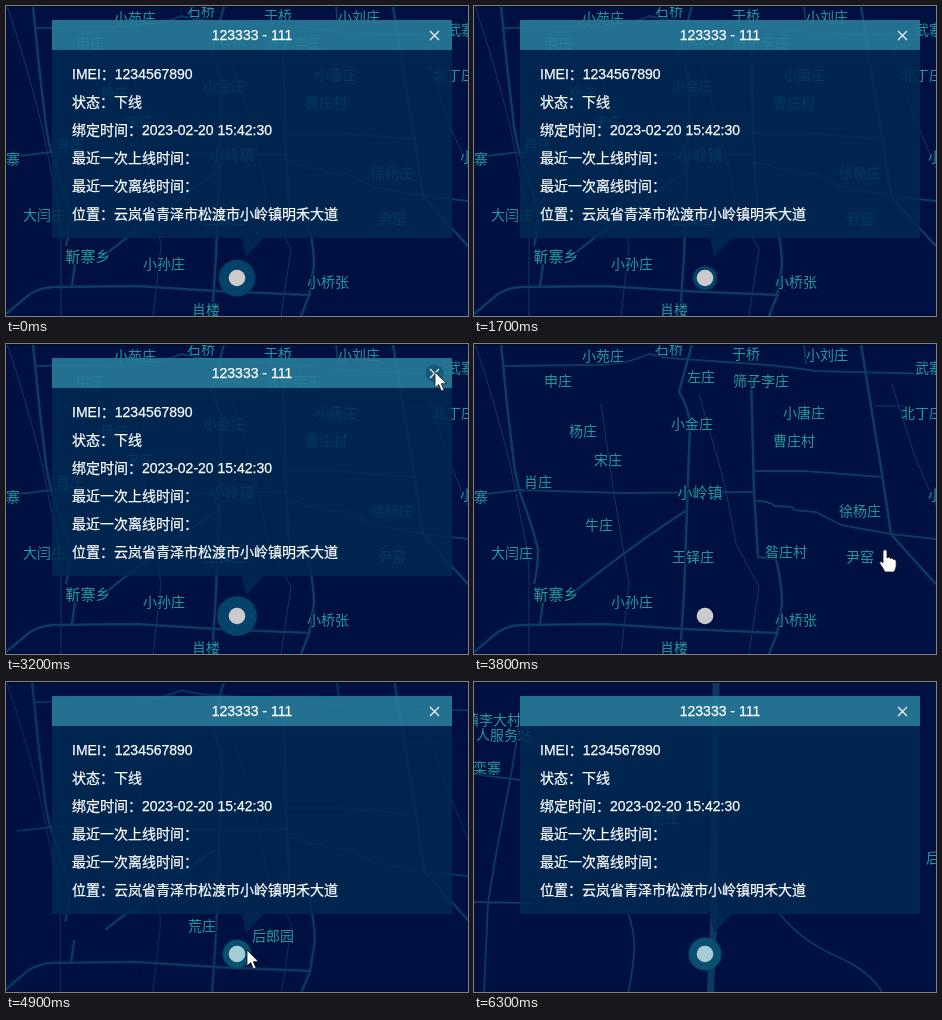
Write an HTML page that moves like this. It is 462 px wide and 310 px high and loops after 6400 ms.

```html
<!DOCTYPE html>
<html lang="zh-CN">
<head>
<meta charset="utf-8">
<title>Device map</title>
<style>
html, body { margin: 0; width: 100%; height: 100%; overflow: hidden; background: #001041; }
svg { display: block; width: 100vw; height: 100vh; }
svg * { animation-duration: 6400ms; animation-iteration-count: infinite; animation-timing-function: linear; }

.road { fill: none; stroke: #0d3a60; stroke-width: 2.6; stroke-linejoin: round; }
.road path { vector-effect: non-scaling-stroke; }
.road .thin { stroke-width: 1; stroke: #133464; }
.road .mid { stroke-width: 1.8; }
.road .wide { stroke-width: 7; stroke: #0c3861; }
.label { font: 14px "Noto Sans CJK SC", "Noto Sans CJK", sans-serif; fill: #1f9b9e; text-anchor: middle;
  stroke: #001041; stroke-width: 2px; paint-order: stroke; }
.label .town { font-size: 15px; }

#far { animation-name: far; }
#farLabels { animation-name: farLabels; animation-timing-function: step-end; }
#near { animation-name: near; }
#near, #far { transform-origin: 0 0; }
.place { animation-name: place; }
.zooming { animation-name: zooming; animation-timing-function: step-end; }
.arrived { animation-name: arrived; animation-timing-function: step-end; }
.place, .zooming, .arrived { transform-box: view-box; transform-origin: 0 0; }

@keyframes far {
  0%, 76.56% { transform: translate(0px, 0px) scale(1); opacity: 1; }
  80.5% { opacity: 0; }
  81.25% { transform: translate(-329.7px, -476.7px) scale(2.667); opacity: 0; }
  85.93%, 100% { transform: translate(-593px, -842px) scale(4); opacity: 0; }
}
@keyframes farLabels { 0% { opacity: 1; } 76.56%, 100% { opacity: 0; } }
@keyframes near {
  0% { transform: none; opacity: 1; }
  .01%, 76.55% { opacity: 0; }
  0%, 85.93%, 100% { transform: translate(0px, 0px) scale(1); opacity: 1; }
  .02%, 76.56% { transform: translate(148.25px, 210.5px) scale(.25); opacity: 0; }
  80.5% { opacity: 1; }
  81.25% { transform: translate(65.67px, 84.67px) scale(.667); opacity: 1; }
}
#nearWrap { animation-name: reopened; animation-timing-function: step-end; }
@keyframes reopened { 0% { opacity: 0; } 76.56%, 100% { opacity: 1; } }
@keyframes place {
  0%, 76.56% { transform: translate(calc(var(--x) * .25 + 148.25px), calc(var(--y) * .25 + 210.5px)); }
  81.25% { transform: translate(calc(var(--x) * .667 + 65.67px), calc(var(--y) * .667 + 84.67px)); }
  85.93%, 100% { transform: translate(var(--x), var(--y)); }
}
@keyframes zooming { 0% { opacity: 0; } 79.68% { opacity: 1; } 84.37%, 100% { opacity: 0; } }
@keyframes arrived { 0% { opacity: 0; } 84.37%, 100% { opacity: 1; } }

.shown { animation-name: shown; animation-timing-function: step-end; }
@keyframes shown { 0% { opacity: 1; } 51.56% { opacity: 0; } 76.56%, 100% { opacity: 1; } }

#pulse { animation-name: pulse; animation-timing-function: ease-in-out; }
@keyframes pulse {
  0% { transform: scale(.92); }
  2.34%, 17.97%, 33.59%, 49.22%, 87.19% { transform: scale(1); }
  10.16%, 25.78%, 41.41%, 79.38%, 95% { transform: scale(.6); }
  76.56% { transform: scale(.72); }
  100% { transform: scale(.88); }
}
#ring { animation-name: ring; animation-timing-function: step-end; }
@keyframes ring { 0% { fill: #04426a; } 76.56%, 100% { fill: #07506f; } }
#core { animation-name: core; animation-timing-function: step-end; }
@keyframes core { 0% { fill: #cbcbcb; } 76.56%, 100% { fill: #a5cdd5; } }

#popup text { font: 14px Arial, "Liberation Sans", "Noto Sans CJK SC", "Noto Sans CJK", sans-serif; fill: #fff;
  stroke: #fff; stroke-width: .25px; }
#hover { animation-name: hover; animation-timing-function: step-end; }
@keyframes hover { 0% { opacity: 0; } 40.62% { opacity: 1; } 51.56%, 100% { opacity: 0; } }

#cursor { animation-name: move; animation-timing-function: ease-in-out; }
@keyframes move {
  0%, 31.24% { transform: translate(400px, 312px); }
  35.94% { transform: translate(444px, 150px); }
  40.62%, 54.68% { transform: translate(429px, 28px); }
  59.37% { transform: translate(411px, 206px); }
  65.62% { transform: translate(258px, 280px); }
  71.87%, 76.56% { transform: translate(241px, 268px); }
  79.68%, 86.5% { transform: translate(255px, 281px); }
  96.8%, 100% { transform: translate(470px, 150px); }
}
#arrow { animation-name: arrow; animation-timing-function: step-end; }
@keyframes arrow {
  0% { opacity: 0; } 31.24% { opacity: 1; } 51.56% { opacity: 0; }
  76.56% { opacity: 1; } 96.8%, 100% { opacity: 0; }
}
#hand { animation-name: hand; animation-timing-function: step-end; }
@keyframes hand { 0% { opacity: 0; } 51.56% { opacity: 1; } 76.56%, 100% { opacity: 0; } }
</style>
</head>
<body>
<svg viewBox="0 0 462 310" preserveAspectRatio="none">
  <rect width="462" height="310" fill="#001041"/>

  <g id="far" class="road">
    <path class="thin" d="M1 0Q12 32 20 60T36 120L46 170Q54 205 55 230V310"/>
    <path class="thin" d="M127 60L140 150 155 240 147 310M225 50L248 130Q252 145 262 200L285 243 275 310"/>
    <path class="thin" d="M418 40L440 110 462 162M400 62H430"/>
    <path class="mid" d="M28 22L110 21Q150 22 175 10L195 14Q240 17 280 20T340 27L462 30M330 0L332 20"/>
    <path d="M27 0L33 60 40 120Q43 142 50 160T64 205Q64 225 60 240M69 258L66 280"/>
    <path class="mid" d="M12 150L46 146 150 149 280 148"/>
    <path d="M218 0L205 48Q214 62 216 80L213 165 210 250 206 310"/>
    <path d="M213 166Q160 200 100 248"/>
    <path d="M0 308L24 288Q36 281 48 281L130 280 210 285 305 289"/>
    <path d="M277 30L280 148 284 213 302 215Q308 240 308 260L303 290 295 310"/>
    <path d="M387 0L395 50 408 130 417 190Q436 212 462 240"/>
    <path class="mid" d="M281 157Q296 157 301 162L318 163 320 166 342 168 367 181 417 190 462 195M280 127L330 127 408 133"/>
  </g>

  <g id="farLabels" class="label">
    <text x="129" y="17">小苑庄</text><text x="195" y="10">石桥</text>
    <text x="272" y="15">于桥</text><text x="353" y="16">小刘庄</text>
    <text x="84" y="42">申庄</text><text x="227" y="38">左庄</text>
    <text x="287" y="42">筛子李庄</text><text x="455" y="29">武寨</text>
    <text x="109" y="92">杨庄</text><text x="218" y="85">小金庄</text>
    <text x="330" y="74">小唐庄</text><text x="448" y="74">北丁庄</text>
    <text x="320" y="102">曹庄村</text><text x="134" y="121">宋庄</text>
    <text x="64" y="143">肖庄</text><text x="7" y="158">寨</text>
    <text class="town" x="226" y="154">小岭镇</text><text x="386" y="172">徐杨庄</text>
    <text x="461" y="156">小</text><text x="125" y="186">牛庄</text>
    <text x="38" y="214">大闫庄</text><text x="219" y="218">王铎庄</text>
    <text x="312" y="213">昝庄村</text><text x="386" y="218">尹窑</text>
    <text class="town" x="82" y="256">靳寨乡</text><text x="158" y="263">小孙庄</text>
    <text x="322" y="281">小桥张</text><text x="200" y="309">肖楼</text>
  </g>

  <g id="nearWrap">
    <g id="near" class="road">
      <path class="mid" d="M-98 -86Q-30 -112 67 -127M-83 15L-29 -15 40 -50"/>
      <path class="mid" d="M-38 38Q-52 140 -53 248L-56 338"/>
      <path class="mid" d="M46 35Q40 80 30 130T14 222L10 310M0 92L46 98M0 220L60 221"/>
      <path class="mid" d="M152 225Q162 250 160 272T154 312"/>
      <path class="mid" d="M306 232Q326 258 362 274T409 312"/>
      <path class="wide" d="M250 -150L242 0 240 230 236 320"/>
    </g>
    <g class="label">
      <g class="zooming"><text class="place" y="5" style="--x:291px;--y:10px">王铎庄</text></g>
      <text class="place" y="5" style="--x:191px;--y:136px">荒庄</text>
      <text class="place" y="5" style="--x:473px;--y:176px">后郎园</text>
      <g class="arrived">
        <text x="19" y="43">镇李大村</text>
        <text x="30" y="58">人服务站</text>
        <text x="13" y="91">栾寨</text>
      </g>
    </g>
  </g>

  <rect width="462" height="1" fill="#000a20"/>

  <g transform="translate(231 272)">
    <g class="shown"><g id="pulse"><circle id="ring" r="20"/></g></g>
    <circle id="core" r="8.3"/>
  </g>

  <g id="popup" class="shown">
    <path d="M46 44H446V232H258L240 251 236 232H46Z" fill="#012a52" fill-opacity=".87"/>
    <rect x="46" y="14" width="400" height="30" fill="#277b98" fill-opacity=".91"/>
    <text x="246" y="34" text-anchor="middle">123333 - 111</text>
    <circle id="hover" cx="428.5" cy="29.5" r="9" fill="#0b4a68" fill-opacity=".6"/>
    <path d="M424 25L433 34M433 25L424 34" stroke="#fff" stroke-width="1.1"/>
    <text x="66" y="73">IMEI：1234567890</text>
    <text x="66" y="101">状态：下线</text>
    <text x="66" y="129">绑定时间：2023-02-20 15:42:30</text>
    <text x="66" y="157">最近一次上线时间：</text>
    <text x="66" y="185">最近一次离线时间：</text>
    <text x="66" y="213">位置：云岚省青泽市松渡市小岭镇明禾大道</text>
  </g>

  <g id="cursor" fill="#fff" stroke="#111" stroke-width=".8" stroke-linejoin="round">
    <path id="arrow" d="M0 0V16L3.7 12.6 6.4 19 9 17.9 6.3 11.7H11.5Z"/>
    <path id="hand" d="M-2 1Q0 -2 2 1V8Q4 6 5.5 8.5 7.5 7 8.5 9.5 11 8.5 11.2 11.5V16Q11 19 9 22H0Q-2 18 -5 14 -6 11 -3.5 11.5L-2 13Z"/>
  </g>
</svg>
</body>
</html>
```
